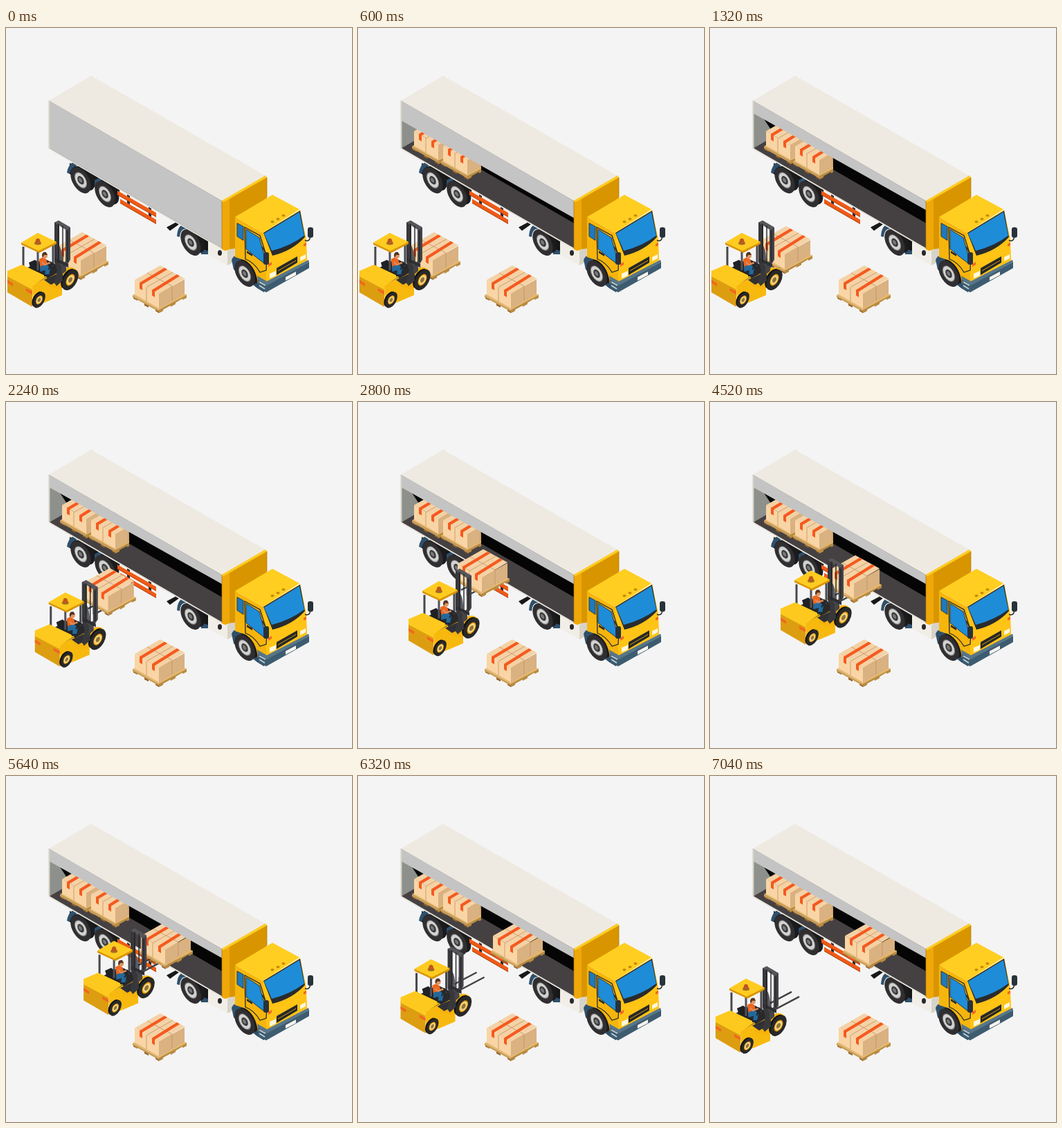
Write an HTML page that moves like this. It is 500x500 px and loops after 7360 ms.

```html
<!DOCTYPE html>
<html lang="en">
<head>
<meta charset="utf-8">
<title>Loading a truck</title>
<style>
html, body { margin: 0; width: 100%; height: 100%; overflow: hidden; background: #f4f4f4; }
svg { display: block; width: 100%; height: 100%; }
</style>
</head>
<body>
<svg viewBox="0 0 500 500">
<defs>
  <g id="pallet">
    <path fill="#8f632b" d="M1 45l6 3v3l-6-3zM17 54l6 3v4l-6-3zM33 63l5 3v3l-5-3z"/>
    <path fill="#b98a42" d="M38 64L78 42V47L72 50V48L62 54V56L55 60V58L44 64V66L38 69Z"/>
    <path fill="#cb9c54" d="M0 43L38 64V67L0 46Z"/>
    <path fill="#e3b870" d="M0 43L40 21 78 43 38 64Z"/>
    <path fill="#f9d5a5" d="M3 21L38 41V62L3 42Z"/>
    <path fill="#dab180" d="M38 41L75 20V41L38 62Z"/>
    <path fill="#f4d2a6" d="M3 21L40 0 75 19 38 41Z"/>
    <path fill="none" stroke="#bd9469" stroke-width=".8" d="M21 31L58 10M21 11L57 30V51M20 31V52"/>
    <path fill="#f5591f" d="M10 25L46 3.500 50 6 14 27.500V36L10 33.500ZM28 35.500L64 13 68 15.500 32 38V46L28 43.500Z"/>
  </g>
  <g id="wheel" transform="matrix(.866 .5 0 1 0 0)">
    <circle cx="7" cy="-7" r="16.500" fill="#1b1b1c"/>
    <circle r="17" fill="#302e30"/>
    <circle r="10.500" fill="#77797a"/>
    <circle r="9.500" fill="#d2d2d0"/>
    <circle r="5.500" fill="#3a393b"/>
    <circle cx="-.5" r="3" fill="#777"/>
  </g>
  <g id="forkWheel" transform="matrix(.866 -.5 0 1 0 0)">
    <circle cx="-3" cy="-3" r="13" fill="#111"/>
    <circle r="13.500" fill="#292829"/>
    <circle r="7.500" fill="#e7a008"/>
    <circle r="6" fill="#f1d78c"/>
    <circle r="3.500" fill="#927238"/>
  </g>
  <clipPath id="rearCargo"><path d="M60 100H169L178 194V225H60Z"/></clipPath>
</defs>

<g id="chassis">
  <path fill="#171819" d="M92 195L165 230 162 249 120 225 92 211ZM232 288L247 280 251 283 237 293Z"/>
  <path fill="#2f506b" d="M88 209Q90 197 97 194L103 199Q95 200 92 211ZM123 227Q127 218 137 216L159 231V250L153 232Q138 217 127 230Z"/>
  <use href="#wheel" x="108" y="220"/>
  <use href="#wheel" x="143" y="240"/>
  <path fill="#2b2a2b" d="M175 239h4v20h-4zM206 257h4v20h-4z"/>
  <path fill="#ef5a16" d="M161 235L217 267V273L161 241ZM165 247L217 277V283L165 253Z"/>
  <path fill="none" stroke="#ae3d0b" d="M161 241L217 273M165 253L217 283"/>
  <path fill="#2f506b" d="M247 301Q248 286 256 284L294 306V327L282 327Q278 299 264 291 252 287 251 302Z"/>
  <path fill="#151617" d="M275 295L292 306 292 322 280 318Z"/>
  <use href="#wheel" x="267" y="310"/>
  <path fill="#f1eee7" d="M292 308L320 322 331 317V337L320 343 292 328Z"/>
  <path fill="#d7d3c9" d="M320 322L331 317V337L320 343Z"/>
  <ellipse cx="309" cy="325" rx="3" ry="4" fill="#27282a"/>
</g>

<g id="interior">
  <path fill="#050505" d="M62 107L312 250V319L62 174Z"/>
  <path fill="#8d908b" d="M63 121L77 130 94 156 63 174Z"/>
  <path fill="#454142" d="M63 174L94 156 312 282V319Z"/>
  <path fill="none" stroke="#e8e5dc" stroke-width="2" d="M62 174L312 319"/>
  <use href="#pallet" x="78" y="128"/>
  <g clip-path="url(#rearCargo)"><use href="#pallet" x="120" y="150"/></g>
</g>

<g id="forks">
  <path fill="none" stroke="#434347" stroke-width="2.500" d="M78 354L112 336M87 362L123 343M76 338V355M87 343V362"/>
</g>

<use id="cargo" href="#pallet"/>

<g id="trailer">
  <path id="door" fill="#c4c4c5"/>
  <path fill="none" stroke="#d4d1c7" stroke-width="2" d="M62.500 105V174"/>
  <path fill="#eeeae2" d="M62 105L123 69 376 214 312 250Z"/>
  <path fill="none" stroke="#a9a6a0" stroke-width=".5" d="M62 105L312 250"/>
  <path fill="#d99500" d="M322 246L377 215V246L334 276V318L322 320Z"/>
  <path fill="#f0a808" d="M312 250L323 244V320L317 322 312 320Z"/>
  <path fill="#fecb20" d="M311 250L375 213 377 216 314 252Z"/>
  <path fill="none" stroke="#ad7600" stroke-width=".7" d="M312 250V319M377 216V244"/>
</g>

<g id="cab">
  <path fill="#2f506b" d="M326 335Q330 326 340 330L364 345 378 366 373 382 363 376 329 349Z"/>
  <use href="#wheel" x="345" y="355"/>
  <path fill="#f6b50d" d="M331 273L371 296 382 329 378 366 364 369Q361 345 346 336L331 331Z"/>
  <path fill="#ffce20" d="M331 273L385 241 424 262 371 296Z"/>
  <path fill="#ffc415" d="M371 296L425 263 434 306 435 336 377 369Z"/>
  <path fill="#292b2d" d="M372 296L425 264 432 302Q414 322 385 329Z"/>
  <path fill="#1f8cd8" d="M373 297L424 266 431 300Q411 315 384 322Z"/>
  <path fill="#1d79bd" stroke="#263b49" d="M334 282L343 287V307L334 301Z"/>
  <path fill="none" stroke="#25282b" stroke-width="1.300" d="M345 288L367 300 377 331 376 350 367 353Q358 338 346 334Z"/>
  <path fill="#1f8cd8" stroke="#263b49" d="M347 291L366 303 373 328V340L360 330 347 319Z"/>
  <path fill="#292a2b" d="M348 322l8 5v3l-8-5z"/>
  <g fill="#c48608"><ellipse cx="385" cy="280" rx="2.500" ry="1.800"/><ellipse cx="393" cy="276" rx="2.500" ry="1.800"/><ellipse cx="401" cy="271" rx="2.500" ry="1.800"/></g>
  <path fill="#262728" d="M391 347L421 330V339L391 357Z"/>
  <path stroke="#d59a12" d="M393 351L419 336"/>
  <path fill="#fff7dd" d="M381 355L390 351V358L381 362ZM425 331L433 327V333L425 337Z"/>
  <path fill="#f26722" d="M379 341l5-3v4l-5 3zM430 312l4-2v4l-4 2z"/>
  <path fill="#587689" d="M363 358L377 366 437 335 438 338 377 373 364 365Z"/>
  <path fill="#3e5c70" d="M364 364L377 372 438 338V347L376 382 365 376Z"/>
  <path fill="#f7f5ee" d="M404 360L419 352V357L404 365Z"/>
  <path stroke="#c9d3d8" stroke-width="1.500" d="M366 367l9 5M366 372l8 5"/>
  <path fill="none" stroke="#222" stroke-width="1.500" d="M370 316L376 327M432 307Q440 310 440 298"/>
  <rect x="372" y="324" width="8" height="18" rx="3" fill="#29323a"/>
  <rect x="436" y="288" width="8" height="15" rx="3" fill="#29323a"/>
</g>

<use href="#pallet" x="183" y="343"/>

<g id="forklift">
  <path fill="#29292b" d="M28 348L55 333 84 348 82 370 60 378 31 363Z"/>
  <path fill="none" stroke="#46484d" stroke-width="3" d="M25 316V346M68 313V344"/>
  <path fill="#202124" d="M33 339L42 335 49 341V352L57 356 50 362 38 355Z"/>
  <path fill="#f8b90f" d="M38 372L59 360 62 372 72 374 81 370V386L60 395 39 403Z"/>
  <path fill="#dd9d10" d="M2 356L38 376V403L2 382Z"/>
  <path fill="#fec91e" d="M2 351L23 342 59 359 38 373V378L2 359Z"/>
  <path fill="#f36420" d="M2 364l8 5v4l-8-5zM29 376l9 5v4l-9-5z"/>
  <path fill="#f6b30d" d="M58 363L83 349Q95 342 103 351L82 360 78 378 59 373Z"/>
  <path fill="#313135" d="M55 364L72 356 82 362 65 371Z"/>
  <use href="#forkWheel" transform="translate(48 393) scale(.76)"/>
  <use href="#forkWheel" transform="translate(93 364)"/>
  <g id="driver">
    <path fill="#f0651d" d="M48 334Q54 329 59 336L60 348 50 351Z"/>
    <path fill="#23699d" d="M50 344L59 342 64 347 62 357 56 358 57 350 49 352Z"/>
    <path fill="none" stroke="#d98b58" stroke-width="2.500" d="M52 338L56 342 64 339"/>
    <circle cx="56" cy="329" r="4" fill="#dc9865"/>
    <path fill="#573321" d="M52 329Q52 323 58 324L60 328 55 328 53 332Z"/>
    <path fill="#1c2734" d="M55 356l7 0v3l-7 0z"/>
  </g>
  <path fill="none" stroke="#25262a" stroke-width="2" d="M61 349L67 341M64 338L70 343"/>
  <path fill="none" stroke="#505359" stroke-width="3" d="M46 322V350"/>
  <path fill="none" stroke="#555960" stroke-width="4" d="M73 312Q80 320 79 340L72 370"/>
  <path fill="#38383b" d="M70 281L77 279V340L82 345V365L73 373 70 368 74 350 70 338Z"/>
  <path fill="#454549" d="M86 290L93 288V335L87 344V351L80 357V342L86 337Z"/>
  <path fill="#56565a" d="M70 281L76 278 93 288 87 292Z"/>
  <path fill="#303034" d="M71 332L90 341V346L71 337Z"/>
  <path fill="none" stroke="#242427" stroke-width="1.400" d="M76 283V339M82 286V339M89 293V338"/>
  <path fill="#d99504" d="M22 310L47 321 73 309V312L48 325 22 313Z"/>
  <path fill="#ffcb20" d="M22 310L46 296 73 309 47 322Z"/>
  <ellipse cx="46" cy="311" rx="5" ry="2.500" fill="#9d7125"/>
  <path fill="#bd5722" d="M42 310L43.500 305Q46 303 48.500 305L50 310Q46 313 42 310Z"/>
</g>
</svg>

<script>
const LOOP = 7360;
const SLOPE = -0.525;
const byId = id => document.getElementById(id);
const [door, cargo, forklift, forks] = ["door", "cargo", "forklift", "forks"].map(byId);

// Linear interpolation through [time, value] keys, held at both ends.
function track(keys, t) {
  const i = keys.findIndex(([time]) => time > t);
  if (i < 0) return keys.at(-1)[1];
  if (i === 0) return keys[0][1];
  const [t0, v0] = keys[i - 1], [t1, v1] = keys[i];
  return v0 + (v1 - v0) * (t - t0) / (t1 - t0);
}

const OPENING = [[0, 0], [760, 1]];
const DRIVE = [[1528, 0], [3320, 100], [4800, 100], [5200, 122], [5480, 122], [7040, 6]];
const LIFT = [[1000, 0], [2640, 45], [3560, 45], [4480, 21]];
const DROP_OFF = 5200;

function move(element, x, y) {
  element.setAttribute("transform", `translate(${x} ${y})`);
}

function draw(now) {
  const t = Math.floor(now % LOOP / 40) * 40;
  const open = track(OPENING, t);
  const drive = track(DRIVE, t);
  const lift = track(LIFT, t);
  const cargoDrive = track(DRIVE, Math.min(t, DROP_OFF));

  door.setAttribute("d", `M62 105L312 250V${318 - 55 * open}L62 ${173 - 50 * open}Z`);
  move(forklift, drive, drive * SLOPE);
  move(forks, drive, drive * SLOPE - lift);
  move(cargo, 70 + cargoDrive, 295 + cargoDrive * SLOPE - lift);
}

const start = performance.now();
function frame(now) {
  draw(Math.max(0, now - start));
  requestAnimationFrame(frame);
}
draw(0);
requestAnimationFrame(frame);
</script>
</body>
</html>
```
